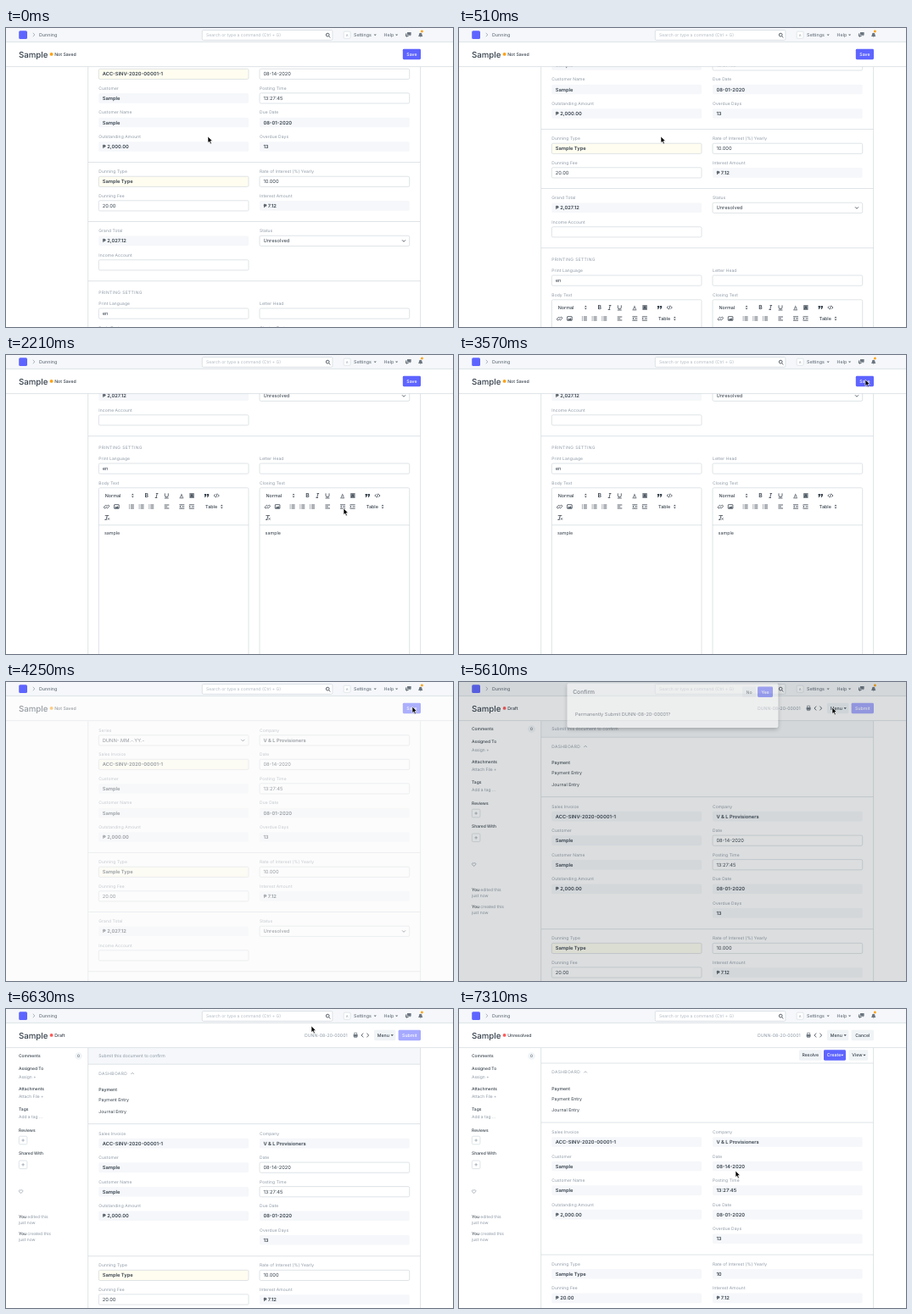
An HTML page for the animation above (7.99 s loop, 527x353 px).

```html
<!DOCTYPE html>
<html lang="en">
<head>
<meta charset="utf-8">
<title>Dunning form</title>
<style>
html, body { margin: 0; width: 100%; height: 100%; overflow: hidden; background: #fff; }
svg { display: block; width: 527px; height: 353px; }
text { font-family: Inter, "Open Sans", sans-serif; fill: #36414c; text-rendering: geometricPrecision; white-space: pre; }
.muted { fill: #8d99a6; }
.label { fill: #8d99a6; letter-spacing: .1px; }
.medium { font-weight: 500; }
.bold { font-weight: 600; }
.nav { fill: #6c7680; font-weight: 500; }
.white { fill: #fff; font-weight: 500; }
.caps { fill: #8d99a6; letter-spacing: .35px; }
.line { fill: none; stroke: #d1d8dd; stroke-width: .7; }
.icon { fill: none; stroke: #36414c; stroke-width: .8; }
.thin { fill: none; stroke: #8d99a6; stroke-width: .7; }
</style>
</head>
<body>
<svg id="stage" viewBox="0 0 527 353"></svg>
<script>
const STEP = 170, LOOP = 7990;
const LEFT = 109.3, RIGHT = 299, FIELD = 176.7;
const PRIMARY = '#5e64ff', PALE = '#f5f7fa', GREY = '#f0f4f7';

const text = (x, y, s, size = 5.76, cls = '', anchor = 'start') =>
  `<text x="${x}" y="${y + size * .364}" font-size="${size}" class="${cls}" text-anchor="${anchor}">${s.replace(/&/g, '&amp;')}</text>`;
const rect = (x, y, w, h, fill, r = 0, extra = '') =>
  `<rect x="${x}" y="${y}" width="${w}" height="${h}" rx="${r}" fill="${fill}" ${extra}/>`;
const path = (d, cls = 'icon', extra = '') => `<path d="${d}" class="${cls}" ${extra}/>`;
const dot = (x, y, r, fill) => `<circle cx="${x}" cy="${y}" r="${r}" fill="${fill}"/>`;
const group = (id, body, extra = '') => `<g id="${id}" ${extra}>${body}</g>`;
const divider = y => path(`M97 ${y}H488.5`, 'line');
const button = (x, w, y, label, fill = GREY, cls = 'medium') =>
  rect(x, y - 6.2, w, 12.4, fill, 1.4) + text(x + w / 2, y, label, 5.2, cls, 'middle');
const menuButton = (x, w, y, label, fill, cls = 'medium') =>
  rect(x, y - 6.2, w, 12.4, fill, 1.4) + text(x + 3.8, y, label, 5.2, cls) +
  caret(x + w - 4.2, y, cls === 'white' ? '#fff' : '#36414c');
const caret = (x, y, fill = '#6c7680') => `<path d="M${x - 1.6} ${y - .8}h3.2l-1.6 1.8z" fill="${fill}"/>`;

// kind: ro (read only), in (input), req (highlighted), set (bold input), sel (select)
function field(x, y, label, value, kind) {
  const mid = y + 11.8, fixed = kind === 'ro';
  const fill = fixed ? PALE : kind === 'req' ? '#fffdf0' : '#fff';
  const bold = fixed || kind === 'req' || kind === 'set';
  return text(x, y, label, 4.94, 'label') +
    rect(x, mid - (fixed ? 5.8 : 6.1), FIELD, fixed ? 11.6 : 12.2, fill, 1.6, fixed ? '' : 'class="box" stroke="#d1d8dd" stroke-width=".7"') +
    text(x + 4.4, mid, value, 5.76, bold ? 'bold' : '') +
    (kind === 'sel' ? path(`M${x + 168} ${mid - 1}l2 2 2-2`, 'icon') : '');
}
const pitch = 28.55;
const column = (x, y, rows) => rows.map((row, i) => row ? field(x, y + i * pitch, ...row) : '').join('');

const list = (x, y, lines = 3) => Array.from({ length: lines }, (_, i) =>
  `M${x - 1} ${y - 2 + i * 2}h4M${x - 3} ${y - 2 + i * 2}h1`).join('');
const updown = (x, y) => `<path d="M${x - 1.4} ${y - .7}l1.4-1.6 1.4 1.6zM${x - 1.4} ${y + .7}l1.4 1.6 1.4-1.6z" fill="#36414c"/>`;

function editor(x, y, label) {
  const a = y + 15, b = a + 13, c = b + 13, at = n => x + n;
  const indent = (n, dir) => path(`M${at(n) - 3} ${b - 2.2}h6M${at(n)} ${b}h3M${at(n) - 3} ${b + 2.2}h6`) +
    path(`M${at(n) - 2 + dir} ${b - 1.2}l${-dir * 1.4} 1.2 ${dir * 1.4} 1.2`);
  return text(x, y, label, 4.94, 'label') +
    rect(x, y + 5.8, FIELD, 320, '#fff', 1.6, 'stroke="#d1d8dd" stroke-width=".7"') +
    path(`M${x} ${y + 49.8}h${FIELD}`, 'line') +
    text(at(7.4), a, 'Normal', 5.4, 'medium') + updown(at(40), a) +
    text(at(56.5), a, 'B', 6.8, 'bold', 'middle') +
    path(`M${at(67.5)} ${a - 2.5}h2.6M${at(66.4)} ${a + 2.5}h2.6M${at(68.9)} ${a - 2.5}l-1.2 5`) +
    path(`M${at(78)} ${a - 2.6}v2.4q0 2 2 2t2-2v-2.4M${at(77.6)} ${a + 3}h4.8`) +
    text(at(97.6), a - .4, 'A', 5.6, '', 'middle') + path(`M${at(95.2)} ${a + 2.8}h4.8`) +
    rect(at(107), a - 2.9, 5.6, 5.8, '#7d858d', .4) + text(at(109.8), a, 'A', 5, 'bold', 'middle') +
    [124.6, 127.6].map(n => `<path d="M${at(n)} ${a - 2}h2.3v2l-1.2 2h-1l.6-2h-.7z" fill="#36414c"/>`).join('') +
    path(`M${at(137.6)} ${a - 1.7}l-1.8 1.7 1.8 1.7M${at(140.2)} ${a - 1.7}l1.8 1.7-1.8 1.7M${at(139.5)} ${a - 2.3}l-1.2 4.6`) +
    path(`M${at(9.2)} ${b + .3}l-1.2 1.1a1 1 0 0 1-1.5-1.5l1.4-1.3a1 1 0 0 1 1.5 0M${at(9.4)} ${b - .4}l1.2-1.1a1 1 0 0 1 1.5 1.5l-1.4 1.3a1 1 0 0 1-1.5 0`, 'icon', 'transform="translate(0 .2)"') +
    rect(at(18.3), b - 2.3, 5.6, 4.6, 'none', .3, 'stroke="#36414c" stroke-width=".8"') +
    `<path d="M${at(19)} ${b + 1.7}l1.3-2 1 1 1-1.4 1.2 2.4z" fill="#36414c"/>` +
    [38.6, 50.3, 62].map(n => path(list(at(n), b))).join('') +
    path(`M${at(77.4)} ${b - 2}h5.6M${at(77.4)} ${b}h3.6M${at(77.4)} ${b + 2}h5.6`) +
    indent(98, 1) + indent(109.6, -1) +
    text(at(125.8), b, 'Table', 5.4, 'medium') + updown(at(145), b) +
    path(`M${at(7.4)} ${c - 2.4}h4.6M${at(10)} ${c - 2.4}l-1.3 4.8M${at(7)} ${c + 2.4}h2.4M${at(10.6)} ${c + .5}l2 2m0-2l-2 2`) +
    text(at(6.6), y + 59.4, 'sample', 5.4);
}

const amount = '₱ 2,000.00', company = 'V & L Provisioners', invoice = 'ACC-SINV-2020-00001-1';

function newForm() {
  return column(LEFT, 57, [['Series', 'DUNN-.MM.-.YY.-', 'sel'], ['Sales Invoice', invoice, 'req'],
      ['Customer', 'Sample', 'ro'], ['Customer Name', 'Sample', 'ro'], ['Outstanding Amount', amount, 'ro']]) +
    column(RIGHT, 57, [['Company', company, 'set'], ['Date', '08-14-2020', 'in'],
      ['Posting Time', '13:27:45', 'in'], ['Due Date', '08-01-2020', 'ro'], ['Overdue Days', '13', 'ro']]) +
    divider(201.5) +
    column(LEFT, 212.5, [['Dunning Type', 'Sample Type', 'req'], ['Dunning Fee', '20.00', 'in']]) +
    column(RIGHT, 212.5, [['Rate of Interest (%) Yearly', '10.000', 'in'], ['Interest Amount', '₱ 7.12', 'ro']]) +
    divider(271.5) +
    column(LEFT, 282.5, [['Grand Total', '₱ 2,027.12', 'ro'], ['Income Account', '', 'in']]) +
    column(RIGHT, 282.5, [['Status', 'Unresolved', 'sel']]) +
    divider(341.7) + text(LEFT, 355.2, 'PRINTING SETTING', 4.94, 'caps') +
    field(LEFT, 368.3, 'Print Language', 'en', 'in') + field(RIGHT, 368.3, 'Letter Head', '', 'in') +
    editor(LEFT, 397, 'Body Text') + editor(RIGHT, 397, 'Closing Text');
}

function savedForm(submitted) {
  const open = submitted ? 'ro' : 'in';
  return text(LEFT, 76, 'DASHBOARD', 4.94, 'caps') + path('M147.3 77l1.8-1.8 1.8 1.8', 'thin') +
    text(LEFT, 95.6, 'Payment', 5.2, 'medium') + text(LEFT, 107.3, 'Payment Entry', 5.2) +
    text(LEFT, 120.8, 'Journal Entry', 5.2) + divider(135.6) +
    column(LEFT, 146.8, [['Sales Invoice', invoice, 'ro'], ['Customer', 'Sample', 'ro'],
      ['Customer Name', 'Sample', 'ro'], ['Outstanding Amount', amount, 'ro']]) +
    column(RIGHT, 146.8, [['Company', company, 'ro'], ['Date', '08-14-2020', open],
      ['Posting Time', '13:27:45', open], ['Due Date', '08-01-2020', 'ro'], ['Overdue Days', '13', 'ro']]) +
    divider(291.7) +
    column(LEFT, 302.6, [['Dunning Type', 'Sample Type', submitted ? 'ro' : 'req'],
      ['Dunning Fee', submitted ? '₱ 20.00' : '20.00', open]]) +
    column(RIGHT, 302.6, [['Rate of Interest (%) Yearly', submitted ? '10' : '10.000', open],
      ['Interest Amount', '₱ 7.12', 'ro']]);
}

function sidebar() {
  const plus = y => rect(15.3, y, 9.6, 9.6, '#fff', 1.4, 'stroke="#d1d8dd" stroke-width=".7"') +
    path(`M20.1 ${y + 3.1}v3.4M18.4 ${y + 4.8}h3.4`, 'thin');
  const heads = [['Comments', 55.5], ['Assigned To', 70], ['Attachments', 94.5], ['Tags', 118], ['Reviews', 143], ['Shared With', 170.6]];
  const notes = [['Assign +', 80], ['Attach File +', 103.7], ['Add a tag ...', 126.8], ['just now', 252.3], ['just now', 272]];
  const you = (y, verb) => `<text x="15" y="${y + 1.8}" font-size="4.94"><tspan class="medium">You</tspan><tspan fill="#8d99a6"> ${verb} this</tspan></text>`;
  return heads.map(([s, y]) => text(15, y, s, 4.94, 'medium')).join('') +
    notes.map(([s, y]) => text(15, y, s, 4.94, 'muted')).join('') +
    dot(85.5, 55.5, 4.3, GREY) + text(85.5, 55.5, '0', 4.6, '', 'middle') +
    plus(150.2) + plus(179) +
    path('M17.6 217.6l-2-2.1a1.1 1.1 0 0 1 2-1.3 1.1 1.1 0 0 1 2 1.3z', 'thin') +
    you(245.2, 'edited') + you(265.2, 'created');
}

function navbar() {
  return rect(0, 0, 527, 16.4, PALE) + path('M0 16.4H527', 'line') +
    rect(15.2, 3.2, 9.8, 9.8, PRIMARY, 1.6) + path('M31.8 5.8l2 2.2-2 2.2', 'thin') +
    text(39, 8, 'Dunning', 5.3, 'nav') +
    rect(231.3, 2.5, 153.6, 11.8, '#fff', 1.4, 'stroke="#d1d8dd" stroke-width=".7"') +
    text(236, 8.5, 'Search or type a command (Ctrl + G)', 5.05, '', 'start').replace('class=""', 'class="" style="fill:#b3bbc4"') +
    '<circle cx="379.2" cy="8.1" r="1.9" class="icon"/>' + path('M380.6 9.6l1.8 1.8') +
    rect(398.2, 4.2, 7.8, 8, '#fff', 1, 'stroke="#d1d8dd" stroke-width=".6"') + text(402.1, 8.2, 'A', 4, 'muted', 'middle') +
    text(410, 8, 'Settings', 5.3, 'nav') + caret(435.2, 8.2) + text(445.6, 8, 'Help', 5.3, 'nav') + caret(460.6, 8.2) +
    '<path d="M473 5h4.6v3.4h-1v1.2l-1.2-1.2H473zM471 6.4h1.4v2.6h2.2v1h-1.2l-1.2 1.2V10H471z" fill="#6c7680"/>' +
    '<path d="M486 10q1-1 1-3a1.8 1.8 0 0 1 3.4 0q0 2 1 3zM487.8 10.4h1.8l-.9.9z" fill="#6c7680"/>' + dot(490.4, 4, 1.4, '#ffa00a');
}

const status = (label, color) => dot(53.6, 30.9, 1.9, color) + text(57.2, 30.9, label, 5.2, 'medium');
const docTools = () => text(352, 31, 'DUNN-08-20-00001', 5.2, 'muted') +
  rect(409.6, 30, 5, 2.8, '#6c7680', .5) + path('M410.6 30v-1.8h3V30M410.6 32v1.6h3V32', 'thin', 'style="stroke:#6c7680"') +
  path('M421.2 28.6l-2.2 2.4 2.2 2.4M425.4 28.6l2.2 2.4-2.2 2.4') +
  menuButton(434, 25.4, 31, 'Menu', GREY);

const edges = path('M96.7 46V353M488.6 46V353', 'line');
const stage = document.getElementById('stage');
stage.innerHTML = '<defs><filter id="shadow" x="-10%" y="-30%" width="120%" height="170%"><feDropShadow dx="0" dy="2" stdDeviation="2.5" flood-opacity=".45"/></filter></defs>' +
  rect(0, 0, 527, 353, '#fff') +
  group('fresh', newForm()) +
  group('saved', sidebar()) +
  group('draft', rect(97, 46, 391.5, 19, PALE) + text(LEFT, 55.6, 'Submit this document to confirm', 5.1, 'muted') + divider(65.2) + savedForm(false)) +
  group('final', divider(64) + button(401, 26.6, 54.5, 'Resolve') + menuButton(430, 26, 54.5, 'Create', PRIMARY, 'white') +
    menuButton(459.4, 22.8, 54.5, 'View', GREY) + `<g transform="translate(0 -1.6)">${savedForm(true)}</g>`) +
  edges +
  rect(0, 16, 527, 29.6, '#fff') + path('M0 45.6H527', 'line') + text(15, 31.2, 'Sample', 9.7, 'medium') +
  group('freshHead', status('Not Saved', '#ffa00a') + button(467.8, 21.2, 31, 'Save', PRIMARY, 'white')) +
  group('savedHead', docTools()) +
  group('draftHead', status('Draft', '#ff5858') + group('submit', button(462.6, 26.4, 31, 'Submit', PRIMARY, 'white'))) +
  group('finalHead', status('Unresolved', '#ff5858') + button(462.6, 26.4, 31, 'Cancel')) +
  group('freeze', rect(0, 16.8, 527, 337, '#fafafa')) +
  navbar() +
  group('backdrop', rect(0, 0, 527, 353, '#334143')) +
  group('modal', rect(127.6, 8, 248.6, 52.4, '#fff', 2, 'filter="url(#shadow)"') + text(134.2, 18.5, 'Confirm', 6.7, 'medium') +
    button(334, 16.2, 18.3, 'No') + button(352, 18, 18.3, 'Yes', PRIMARY, 'white') +
    text(137, 44, 'Permanently Submit DUNN-08-20-00001?', 5.6)) +
  group('cursor', '<path d="M0 0V7.6l1.7-1.6 1.3 2.9 1.3-.6L3 5.5h2.4z" fill="#000" stroke="#fff" stroke-width=".6"/>');

const $ = id => document.getElementById(id);
const show = (id, opacity) => $(id).setAttribute('opacity', +opacity);
const move = (id, x, y) => $(id).setAttribute('transform', `translate(${x} ${y})`);

// Linear interpolation through [time, value] keys
function track(t, keys) {
  const i = keys.findIndex(k => k[0] > t);
  if (i < 0) return keys[keys.length - 1][1];
  if (!i) return keys[0][1];
  const [t0, a] = keys[i - 1], [t1, b] = keys[i];
  return a + (b - a) * (t - t0) / (t1 - t0);
}

const scroll = [[0, 43], [170, 49], [510, 82], [1190, 163], [1870, 246], [3570, 246], [3910, 0]];
const cursorX = [[1190, 238], [2210, 398], [2720, 425], [3570, 479], [5440, 479], [5950, 362], [6290, 360], [6630, 360], [6970, 326]];
const cursorY = [[1190, 128], [1700, 170], [2210, 181], [2720, 240], [3570, 29], [5440, 29], [5950, 32], [6290, 20], [6630, 20], [6970, 191]];
const freeze = [[3740, 0], [4080, .5]];
const dialog = [[5440, 0], [5780, 1], [6290, 1], [6630, 0]];

function render(t) {
  const saved = t >= 4930, final = t >= 7310, draft = saved && !final;
  show('fresh', !saved); show('freshHead', !saved);
  show('saved', saved); show('savedHead', saved);
  show('draft', draft); show('draftHead', draft);
  show('final', final); show('finalHead', final);
  show('submit', t < 5440 ? 1 : .55);
  show('freeze', saved ? 0 : track(t, freeze));
  move('fresh', 0, -track(t, scroll));
  const open = track(t, dialog);
  show('backdrop', open * .35);
  show('modal', open); move('modal', 0, (open - 1) * 13);
  move('cursor', track(t, cursorX), track(t, cursorY));
}

function tick(now) {
  render(Math.floor(now % LOOP / STEP) * STEP);
  requestAnimationFrame(tick);
}
render(0);
requestAnimationFrame(tick);
</script>
</body>
</html>
```
